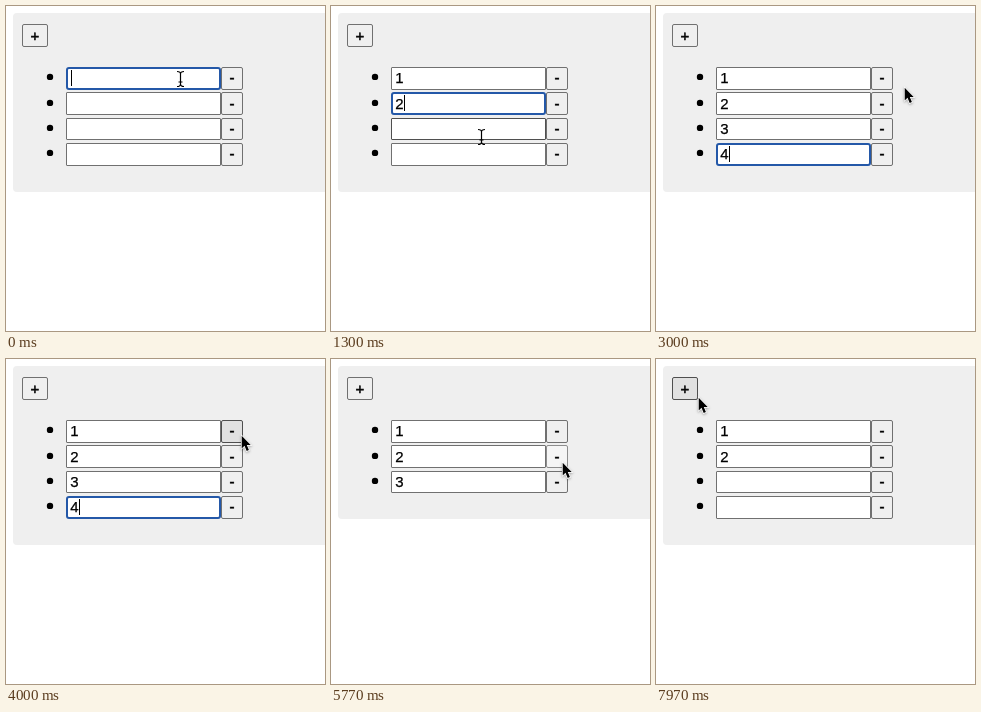
Recreate the animation shown at these times as an HTML page with a canvas. Size 319x325 px, loop 8000 ms.

```html
<!DOCTYPE html>
<html lang="en">
<head>
<meta charset="utf-8">
<title>Editable list</title>
<style>
  html, body { margin: 0; width: 100%; height: 100%; overflow: hidden; background: #fff; }
  canvas { display: block; }
</style>
</head>
<body>
<canvas id="stage" width="319" height="325"></canvas>
<script>
const ctx = document.getElementById('stage').getContext('2d');
const LOOP = 8000, GLIDE = 160, HOLD = 140, BLINK = 500, PITCH = 25.33;

// Glides: arrival time, x, y
const glides = [
  [260, 168, 99], [1000, 150, 131], [2070, 150, 153], [3000, 248, 81],
  [3200, 235, 76], [4670, 231, 75], [4830, 232, 90], [5170, 231, 103],
  [6270, 224, 97], [6970, 47, 55], [7170, 42, 38]
];
// Each row: focus time, typing time
const entries = [[0, 170], [700, 900], [1470, 1870], [2370, 2700]];
// Clicks: press time, change in rows
const clicks = [[4030, -1], [5760, -1], [7290, 1], [7830, 1]];

const rowY = (i, y) => Math.round(y + i * PITCH);

function mouseAt(t) {
  let x = 174, y = 73;
  for (const [end, toX, toY] of glides) {
    const u = Math.min(1, Math.max(0, 1 - (end - t) / GLIDE));
    const ease = u * u * (3 - 2 * u);
    x += (toX - x) * ease;
    y += (toY - y) * ease;
  }
  return { x, y };
}

function stateAt(t) {
  let rows = entries.length, kept = rows, pressed = false;
  for (const [at, change] of clicks) {
    if (t >= at + HOLD) rows += change;
    else if (t >= at) pressed = true;
    kept = Math.min(kept, rows);
  }
  return { t, rows, kept, pressed, mouse: mouseAt(t) };
}

const over = (m, x, y, w, h) => m.x >= x && m.x <= x + w && m.y >= y && m.y <= y + h;

function box(x, y, w, h, fill, stroke, line, r) {
  ctx.beginPath();
  ctx.roundRect(x + line / 2, y + line / 2, w - line, h - line, r);
  ctx.fillStyle = fill;
  ctx.fill();
  ctx.strokeStyle = stroke;
  ctx.lineWidth = line;
  ctx.stroke();
}

function text(s, x, y, align, weight) {
  ctx.fillStyle = ctx.strokeStyle = '#000';
  ctx.lineWidth = weight;
  ctx.textAlign = align;
  ctx.fillText(s, x, y);
  ctx.strokeText(s, x, y);
}

function button(label, x, y, w, h, base, { mouse, pressed }) {
  const hover = over(mouse, x, y, w, h);
  const fill = !hover ? '#efefef' : pressed ? '#f5f5f5' : '#e1e1e1';
  const edge = !hover ? '#707070' : pressed ? '#8d8d8d' : '#4f4f4f';
  box(x, y, w, h, fill, edge, 1, 1.5);
  text(label, x + w / 2, base, 'center', .5);
}

function field(i, y, h, base, { t, kept, mouse }) {
  const [focus, typing] = entries[i];
  const blur = entries[i + 1]?.[0] ?? clicks[0][0];
  const focused = t >= focus && t < blur;
  const typed = t >= typing && i < kept;
  const edge = over(mouse, 60, y, 154, h) ? '#4f4f4f' : '#707070';
  if (focused) box(60, y, 155, h, '#fff', '#2458a8', 2, 2);
  else box(60, y, 155, h, '#fff', edge, 1, .5);
  if (typed) text(String(i + 1), 64.3, base, 'left', .25);
  if (focused && (t - (typed ? typing : focus)) % (2 * BLINK) < BLINK) {
    ctx.fillStyle = '#000';
    ctx.fillRect(typed ? 73 : 65, y + 3, 1, 16);
  }
}

function row(i, state) {
  const y = rowY(i, 61), h = rowY(i, 83.7) - y, base = rowY(i, 77.4);
  ctx.beginPath();
  ctx.arc(44, base - 6.1, 3.2, 0, 7);
  ctx.fillStyle = '#000';
  ctx.fill();
  field(i, y, h, base, state);
  button('-', 215, y, 22, h, base, state);
}

function beam({ x, y }) {
  ctx.save();
  ctx.translate(Math.round(x) + .5, Math.round(y));
  ctx.lineWidth = 1.2;
  ctx.strokeStyle = '#000';
  ctx.stroke(new Path2D('M-3.5 -7.5Q0 -7.5 0 -5Q0 -7.5 3.5 -7.5M0 -6V6' +
    'M-3.5 7.5Q0 7.5 0 5Q0 7.5 3.5 7.5M-2 3H2'));
  ctx.restore();
}

function arrow({ x, y }) {
  ctx.save();
  ctx.translate(x + .7, y + .8);
  const shape = new Path2D('M0 0V12.6L2.8 10L5 15.2L7.2 14.3L5.1 9.2H9Z');
  ctx.shadowColor = 'rgba(0,0,0,.35)';
  ctx.shadowBlur = 2.5;
  ctx.shadowOffsetY = 1;
  ctx.lineWidth = 1.5;
  ctx.strokeStyle = '#fff';
  ctx.stroke(shape);
  ctx.shadowColor = 'transparent';
  ctx.fillStyle = '#000';
  ctx.fill(shape);
  ctx.restore();
}

function draw(t) {
  const state = stateAt(t), { rows, mouse } = state;
  ctx.font = '15px Arial, "Liberation Sans", sans-serif';
  ctx.fillStyle = '#fff';
  ctx.fillRect(0, 0, 319, 325);

  ctx.beginPath();
  ctx.roundRect(7, 7, 320, rowY(rows, 77.4), 4);
  ctx.fillStyle = '#efefef';
  ctx.fill();
  button('+', 16, 18, 26, 23, 35, state);
  for (let i = 0; i < rows; i++) row(i, state);

  const inField = over(mouse, 60, 61, 154, rows * PITCH);
  (inField ? beam : arrow)(mouse);
}

const start = performance.now();
function tick() {
  draw((performance.now() - start) % LOOP);
  requestAnimationFrame(tick);
}
tick();
</script>
</body>
</html>
```
